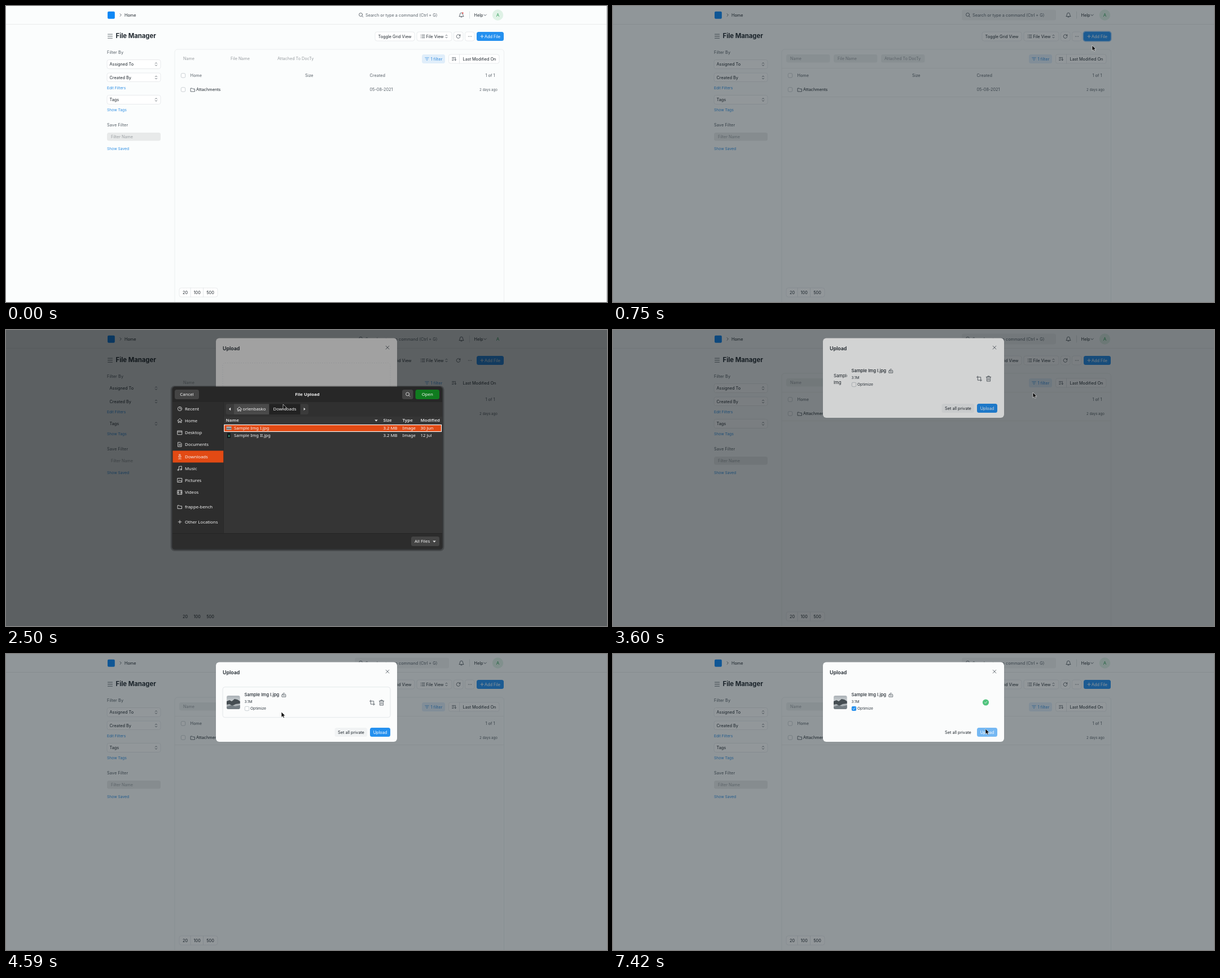
An HTML page for the animation above (8 s loop, 1065 px wide and 526 px high).

```html
<!DOCTYPE html>
<html lang="en">
<head>
<meta charset="utf-8">
<title>File upload</title>
<style>
  html, body { margin: 0; width: 100%; height: 100%; overflow: hidden; background: #fbfdfd; }
  svg { display: block; width: 1065px; height: 526px; }
  text { font: 400 7.3px Inter, sans-serif; fill: #1f272e; white-space: pre; }
  .muted { fill: #59626a; }
  .hint { font-size: 7.2px; fill: #989da1; }
  .label { font-size: 7.2px; letter-spacing: .15px; fill: #505a62; }
  .link { font-size: 6.7px; fill: #2c8ee4; }
  .title { font-size: 11.3px; font-weight: 700; }
  .head { font-size: 8.8px; font-weight: 600; }
  .big { font-size: 7.75px; }
  .name { font-size: 7.75px; font-weight: 500; }
  .small { font-size: 6.15px; }
  .meta { font-size: 6.7px; fill: #333c44; }
  .white { fill: #fff; }
  .mid { text-anchor: middle; }
  .end { text-anchor: end; }
  #picker text { font: 400 7.8px "Noto Sans", sans-serif; fill: #f4f4f4; }
  #picker .bold { font-weight: 700; }
  #picker .col { font-weight: 600; fill: #d0d0d0; }
  .ico { fill: none; stroke: #414a52; stroke-width: .8; stroke-linecap: round; stroke-linejoin: round; }
  .lite { stroke: #fff; }
  .btn { fill: #fff; stroke: #e0e3e5; stroke-width: .7; }
</style>
</head>
<body>
<svg id="stage" viewBox="0 0 1065 526" xmlns="http://www.w3.org/2000/svg"></svg>
<script>
const LOOP = 8000, STEP = 120;
const BLUE = '#2490ef', GREEN = '#48bb74';

// Markup helpers: text is placed by its vertical centre
const text = (x, cy, s, cls = '', dy = 2.65) => `<text x="${x}" y="${cy + dy}" class="${cls}">${s}</text>`;
const box = (x, y, x2, y2, fill, r = 3.5, more = '') =>
  `<rect x="${x}" y="${y}" width="${x2 - x}" height="${y2 - y}" rx="${r}" fill="${fill}" ${more}/>`;
const btn = (x, y, x2, y2) => box(x, y, x2, y2, '#fff', 3.5, 'class="btn"');
const ico = (x, y, d, more = '') => `<path class="ico" transform="translate(${x} ${y})" d="${d}" ${more}/>`;
const dot = (x, y, r, fill) => `<circle cx="${x}" cy="${y}" r="${r}" fill="${fill}"/>`;
const group = (id, ...parts) => `<g id="${id}">${parts.join('')}</g>`;

const UPDOWN = 'M-1.5-1.3L0-2.8 1.5-1.3M-1.5 1.3L0 2.8 1.5 1.3';
const DOWN = 'M-2.3-1L0 1.3 2.3-1';
const RIGHT = 'M-1-2.3L1.3 0-1 2.3';
const FOLDER = 'M-3.5-2.8H-1L0-1.6H3.5V3H-3.5Z';
const LENS = 'M2.6-.6A3 3 0 1 1-3.4-.6 3 3 0 1 1 2.6-.6M1.8 1.7L3.8 3.7';
const TICK = 'M-2 .1L-.6 1.5 2-1.4';
const HOUSE = 'M-4 .2L0-3.8 4 .2M-2.8-.8V3.6H-1V1H1V3.6H2.8V-.8';
const checkbox = (x, y) => box(x - 3.7, y - 3.7, x + 3.7, y + 3.7, '#fff', 1.8, 'stroke="#b4bcc2" stroke-width=".7"');

function page() {
  const fills = group('fills',
    box(299, 77, 882.5, 540, 'none', 5, 'stroke="#eceff0"'),
    btn(654, 46, 724, 62), btn(728, 46, 790, 62), btn(793.5, 46, 810, 62), btn(813.5, 46, 830, 62),
    btn(179, 95.5, 274, 111.5), btn(179, 119, 274, 134.5), btn(179, 158.5, 274, 174.5),
    box(179, 225, 274, 239.5, '#e8eaea'),
    box(737, 86, 778, 102, '#e0eefa'), btn(784.5, 86, 874, 102), btn(307, 501, 375, 517),
    ico(803.5, 94, 'M0-8V8', 'style="stroke:#dfe3e5"'),
    ico(327, 509, 'M0-8V8M22.5-8V8', 'style="stroke:#dfe3e5"'),
    dot(871.5, 16, 9.7, '#dff2e6'), checkbox(314, 123.5), checkbox(314, 148.5));
  const fields = group('fields',
    box(618, 6.5, 785, 25.5, '#eff1f2'),
    ...[307, 391, 475].map(x => box(x, 86, x + 77.5, 100.5, '#eceff0')),
    ico(299, 110.5, 'M0 0H583M0 51H583', 'style="stroke:#eaedee"'));
  return [
    box(0, 0, 1065, 526, '#fbfdfd', 0), box(0, 32, 1065, 33, '#e9ecec', 0), fields, fills,
    box(180, 9.8, 192.8, 22.8, '#0d87f5', 2),
    ico(203, 16, RIGHT), text(210, 16, 'Home'),
    ico(629, 16, LENS), text(637, 16, 'Search or type a command (Ctrl + G)', 'muted'),
    ico(807, 15.5, 'M-3.8 2.8Q-2.6 1.6-2.6-.6A2.6 2.8 0 0 1 2.6-.6Q2.6 1.6 3.8 2.8ZM-1 4.3H1'),
    group('badge', dot(809.3, 12.5, 1.2, '#e24c4c')),
    ico(821.5, 16, 'M0-6V6', 'style="stroke:#d4d8db"'),
    text(829.5, 16, 'Help'), ico(849, 16, DOWN),
    text(871.5, 16, 'A', 'mid" style="fill:#2f9d58;font-size:8px', 2.9),
    ico(184.5, 53.7, 'M-4-3.5H4M-4 0H4M-4 3.5H4'), text(194.5, 53, 'File Manager', 'title', 4.1),
    text(659.5, 54, 'Toggle Grid View'),
    ico(738.5, 54, 'M-1.5-2.5H3.5M-1.5 0H3.5M-1.5 2.5H3.5M-3.5-2.5h.2M-3.5 0h.2M-3.5 2.5h.2'),
    text(744.5, 54, 'File View'), ico(780.5, 54, UPDOWN),
    ico(801.5, 54, 'M3.3 .6A3.3 3.3 0 1 1 2.5-2.2L3.3-1.2M3.4-3.3V-1.1H1.3'),
    ico(822, 54, 'M-2.5 0h.1M0 0h.1M2.5 0h.1', 'style="stroke-width:1.2"'),
    group('ring', box(833.3, 45.3, 882.7, 62.7, 'none', 4, 'stroke="#8cc2f5" stroke-width="1.6"')),
    box(834, 46, 882, 62, BLUE), ico(843.5, 54, 'M-2.7 0H2.7M0-2.7V2.7', 'style="stroke:#fff"'),
    text(848, 54, 'Add File', 'white'),
    text(179, 82.5, 'Filter By', 'label'),
    text(183.5, 103.5, 'Assigned To'), text(183.5, 127, 'Created By'), text(183.5, 166.5, 'Tags'),
    ...[103.5, 127, 166.5].map(y => ico(266, y, UPDOWN)),
    text(179, 145.5, 'Edit Filters', 'link'), text(179, 184.5, 'Show Tags', 'link'),
    text(179, 211, 'Save Filter', 'label'),
    text(186, 232.3, 'Filter Name', 'hint'), text(179, 253.2, 'Show Saved', 'link'),
    text(314, 93, 'Name', 'hint'), text(398, 93, 'File Name', 'hint'), text(481, 93, 'Attached To DocTy', 'hint'),
    ico(746, 94, 'M-3.3-2.3H3.3M-2 0H2M-.7 2.3H.7', 'style="stroke:#4b9be4"'),
    text(752.5, 94, '1 filter', '" style="fill:#3b8fdf'),
    ico(794, 94, 'M-3.5-2.5H.8M-3.5 0H0M-3.5 2.5H-1M2.3-2.8V2.8M.9 1.4L2.3 2.8 3.7 1.4'),
    text(809.5, 94, 'Last Modified On'),
    text(326.5, 123.5, 'Home', 'muted'), text(530, 123.5, 'Size', 'muted'),
    text(644.5, 123.5, 'Created', 'muted'), text(866.5, 123.5, '1 of 1', 'muted end'),
    ico(331, 149, FOLDER), text(337, 148.5, 'Attachments'),
    text(644.5, 148.5, '05-08-2021', 'muted'), text(871, 148.5, '2 days ago', 'small muted end', 2.2),
    text(317.5, 509, '20', 'mid'), text(338.7, 509, '100', 'mid'), text(362, 509, '500', 'mid'),
    group('edge', box(1064, 0, 1065, 526, '#c4c8c9', 0)),
  ].join('');
}

function modal() {
  const source = (x, fill, d, label) => dot(x, 132, 8.4, fill) + ico(x, 132, d, 'style="stroke:#fff"') +
    text(x, 147.3, label, 'small mid', 2.2);
  const drop = group('drop',
    box(384, 58.5, 681, 201, 'none', 4, 'stroke="#e7eaec" stroke-width=".8" stroke-dasharray="2 2"'),
    text(532.3, 110, 'Drag and drop files here or upload from', 'big mid'),
    source(493.5, BLUE, 'M-4-3.2H4V2H-4ZM-2 3.6H2', 'My Device'),
    source(539, GREEN, 'M-4-1.5H4V3.5H-4ZM-3.2-3.3H0L1-1.6M-2 .5H2', 'Library'),
    source(577.5, '#eaa843', 'M-.6 1.8L-2 3.2A1.6 1.6 0 0 1-4 .8L-1.8-1.2M.6-1.8L2-3.2A1.6 1.6 0 0 1 4-.8L1.8 1.2M-1.5 1.5L1.5-1.5', 'Link'));
  const file = group('file',
    group('frame', box(384, 58.7, 681, 112.7, 'none', 4, 'stroke="#dfe3e5" stroke-width=".8"')),
    group('alt', '<g clip-path="url(#clip)">', text(391, 81, 'Sample', 'big'), text(391, 93.5, 'Img', 'big'), '</g>'),
    group('thumb', '<g clip-path="url(#clip)">', box(391, 74, 415, 98, 'url(#sky)', 0),
      '<path d="M391 84l5-2 4 2 5-4 5 1 5 3v4l-8 1-6 3-5-3-5 1z" fill="#454d52"/>',
      '<path d="M391 94l8-3 7 2 9-2v7h-24z" fill="#747d83"/></g>'),
    text(422.5, 72, 'Sample Img I.jpg', 'name', 2.8),
    ico(492.5, 73, 'M-3.2-.8H3.2V3.2H-3.2ZM-1.8-.8V-2A1.8 1.8 0 0 1 1.6-2.6M0 .7V1.7'),
    text(422.5, 84.3, '3.1M', 'meta', 2.4),
    checkbox(427, 97),
    group('checked', box(422.9, 92.9, 431.1, 101.1, BLUE, 2), ico(427, 97, TICK, 'style="stroke:#fff"')),
    text(433, 97, 'Optimize', 'meta', 2.4),
    group('tools',
      ico(649, 86.5, 'M-2.7-4.6V2.7H4.6M-4.6-2.7H2.7V4.6'),
      ico(665.5, 86.5, 'M-4.2-3H4.2M-1.5-3V-4.6H1.5V-3M-3.3-3L-3 4.6H3L3.3-3M-1.1-.8V2.6M1.1-.8V2.6')),
    group('busy', '<circle cx="660.5" cy="86" r="5" fill="none" stroke="#d9e1e8" stroke-width="1.3"/>',
      `<path d="M660.5 81A5 5 0 1 1 655.5 86" fill="none" stroke="${BLUE}" stroke-width="1.3"/>`),
    group('done', dot(660.5, 86, 5.6, '#51c47e'), ico(660.5, 86, TICK, 'style="stroke:#fff"')));
  return group('modal',
    '<rect id="sheet" x="372" y="14.5" width="321" rx="6" fill="#fbfcfc"/>',
    text(384, 32.5, 'Upload', 'head', 3.1), ico(676, 31.2, 'M-2.8-2.8L2.8 2.8M2.8-2.8L-2.8 2.8'),
    drop, file,
    group('actions', group('plain', box(582.5, 131, 640, 147, '#f1f3f4')),
      text(588, 139.2, 'Set all private'),
      group('send', box(645, 131, 681, 147, BLUE), text(663, 139.2, 'Upload', 'white mid'))));
}

function picker() {
  const places = [
    ['Recent', 140, 'M3.6 0A3.6 3.6 0 1 1-3.6 0 3.6 3.6 0 1 1 3.6 0M0-2V0H1.6'],
    ['Home', 161, HOUSE],
    ['Desktop', 182.5, 'M-3.8-3.3H3.8V3.3H-3.8ZM-3.8-1.3H3.8'],
    ['Documents', 203.5, 'M-3-3.8H1L3-1.8V3.8H-3ZM-1.5-.5H1.5M-1.5 1.5H1.5'],
    ['Downloads', 225, 'M-1-3.8H1V0H2.6L0 2.6-2.6 0H-1ZM-2.5 4H2.5'],
    ['Music', 246, 'M-1.6 2.6V-3.4L3.2-4V1.8M-1.6 2.6a1.2 1.2 0 1 1-2.4 0 1.2 1.2 0 1 1 2.4 0M3.2 1.8a1.2 1.2 0 1 1-2.4 0 1.2 1.2 0 1 1 2.4 0'],
    ['Pictures', 267, 'M-3.8-3.5H3.8V3.5H-3.8ZM-2.6 2L-.8-.4 .5 1 1.6 0 2.8 2'],
    ['Videos', 288.5, 'M-3.8-3.5H3.8V3.5H-3.8ZM-2-3.5V3.5M2-3.5V3.5M-3.8 0H-2M2 0H3.8'],
    ['frappe-bench', 314.5, FOLDER],
    ['Other Locations', 341, 'M-2.8 0H2.8M0-2.8V2.8']];
  const cells = (y, cls, ...cols) => cols.map((s, i) => text([404, 668.5, 702.5, 734.5][i], y, s, cls)).join('');
  const lite = (x, y, d) => ico(x, y, d, 'style="stroke:#eee"');
  const tri = (x, y, d) => `<path transform="translate(${x} ${y})" d="${d}" fill="#e4e4e4"/>`;
  return group('picker',
    box(291.5, 99, 776.5, 393, '#000', 7, 'opacity=".22"'), box(293.5, 100, 774.5, 391, '#000', 6, 'opacity=".3"'),
    box(295, 101, 773, 389, '#353535', 5),
    box(295, 101, 773, 128, '#272727', 5), box(295, 121, 773, 128, '#272727', 0),
    box(295, 128, 385.5, 362, '#2d2d2d', 0), box(386, 128, 773, 154, '#303030', 0),
    box(295, 361.5, 773, 384, '#2c2c2c', 0), box(295, 378, 773, 389, '#2c2c2c', 4),
    box(295, 361, 773, 361.7, '#222', 0), box(385.4, 128, 386, 361, '#232323', 0),
    box(299, 106, 342, 123, '#444'), text(320.5, 114.3, 'Cancel', 'mid'),
    text(534, 114.3, 'File Upload', 'bold mid'),
    box(702, 106, 721.5, 123, '#444'), lite(712, 114.5, LENS),
    box(725.5, 106, 768, 123, '#107c1f'), text(746.8, 114.3, 'Open', 'mid'),
    box(295.5, 214.5, 385.3, 235.5, '#e24a14', 0),
    ...places.map(([s, y, d]) => lite(308, y, d) + text(317, y, s)),
    box(389.5, 131.5, 536, 150, '#3b3b3b'), box(404, 131.5, 466, 150, '#4a4a4a', 0), box(466.5, 131.5, 521.5, 150, '#222', 0),
    tri(396.5, 140.5, 'M1.6-2.8V2.8L-1.6 0Z'), lite(413.5, 140.5, HOUSE),
    text(419.5, 140.5, 'orlenbasko'), text(494, 140.5, 'Downloads', 'mid'), tri(529, 140.5, 'M-1.4-2.6V2.6L1.6 0Z'),
    text(389.5, 160.7, 'Name', 'col'), tri(656, 160.7, 'M-2.8-1.3H2.8L0 1.7Z'),
    cells(160.7, 'col', '', 'Size', 'Type', 'Modified'),
    box(386.7, 168.5, 771.5, 180.5, '#e24a14', 0, 'stroke="#fff" stroke-width="1.1"'),
    box(390.5, 171.5, 399.5, 177.5, '#a9b2b8', 0), box(390.5, 174.2, 399.5, 175.8, '#59636a', 0),
    cells(174.5, '', 'Sample Img I.jpg', '3.2 MB', 'Image', '30 Jun'),
    box(392, 183, 397.8, 192, '#101a1a', 0), box(394, 186.5, 396.3, 190, '#3f8f74', 0),
    cells(187.5, '', 'Sample Img II.jpg', '3.2 MB', 'Image', '12 Jul'),
    box(718, 367, 768, 384, '#444'), text(724, 375.5, 'All Files'), tri(759, 375.7, 'M-2.8-1.3H2.8L0 1.7Z'));
}

const stage = document.getElementById('stage');
stage.innerHTML = `<defs>
  <clipPath id="clip"><rect x="391" y="74" width="23.7" height="24" rx="3"/></clipPath>
  <linearGradient id="sky" x2="0" y2="1"><stop stop-color="#aab1b6"/><stop offset=".4" stop-color="#c9ced1"/><stop offset="1" stop-color="#8d959a"/></linearGradient>
  </defs>` + page() + box(0, 0, 1065, 526, '#131e24', 0, 'id="shade"') + modal() +
  box(0, 0, 1065, 526, '#000', 0, 'id="dim"') + picker() +
  group('cursor',
    '<path id="arrow" d="M0 0V9.4L2.2 7.4 3.7 10.6 5.3 9.9 3.9 6.8H6.9Z" fill="#0a0a0a" stroke="#fff" stroke-width=".6"/>',
    '<path id="hand" d="M-1 0Q0-1.2 1 0V3.4L4.6 4.2Q5.6 4.6 5.4 6L4.6 9.6H-.8L-3.6 5.6Q-3.4 4.4-2.3 4.8L-1 6Z" fill="#fff" stroke="#111" stroke-width=".9"/>');
const el = {};
stage.querySelectorAll('[id]').forEach(n => el[n.id] = n);

// Bursts of screen updates: first time and count
const bursts = [[510, 6], [1250, 5], [2000, 4], [2500, 4], [3000, 7], [3840, 1], [3990, 1],
  [4230, 4], [4730, 2], [5100, 3], [5860, 2], [6130, 3], [6520, 4], [7300, 2]];
const ticks = bursts.flatMap(([t, n]) => Array.from({ length: n }, (_, i) => t + i * STEP));
const snap = t => ticks.reduce((last, k) => k <= t ? k : last, 0);

// Tracks of [time, value, ...], linear between keys
const tracks = {
  shade: [[390, 0], [510, .12], [630, .36], [750, .46]],
  modal: [[750, 0], [870, .45], [990, .85], [1110, 1]],
  dim: [[1880, 0], [2000, .1], [2360, .36], [3240, .36], [3720, .1], [3840, 0]],
  picker: [[1880, 0], [2000, .35], [2240, 1], [3240, 1], [3480, 0]],
  fills: [[2000, 1], [2360, 0], [3240, 0], [3600, 1]],
  cursor: [[510, 856, 57], [750, 849, 70], [1110, 832, 80], [1250, 790, 87], [1610, 510, 127], [1730, 493, 131.5],
    [2000, 491, 132], [2860, 491, 132], [3240, 744, 111], [4110, 744, 111], [4230, 700, 110], [4590, 488, 103],
    [4730, 440, 99], [4850, 430, 97], [5860, 430, 96.5], [5980, 471, 103], [6370, 600, 122], [6880, 660, 133]],
};
function at(keys, t) {
  const i = keys.findIndex(k => k[0] > t);
  if (i === 0) return keys[0].slice(1);
  if (i < 0) return keys[keys.length - 1].slice(1);
  const [a, b] = [keys[i - 1], keys[i]], p = (t - a[0]) / (b[0] - a[0]);
  return a.slice(1).map((v, j) => v + (b[j + 1] - v) * p);
}

// Spans in which a part is visible
const spans = {
  edge: [0, 510], badge: [0, 510], fields: [510, LOOP], ring: [510, 870], cursor: [510, LOOP],
  hand: [1610, 2000], drop: [0, 3360], file: [3360, LOOP], alt: [0, 3990], thumb: [3990, LOOP],
  frame: [4230, 6250], plain: [3360, 6250], checked: [5100, LOOP],
  tools: [0, 7300], busy: [7300, 7420], done: [7420, LOOP],
};

function draw(now) {
  const t = snap(now % LOOP);
  for (const id in spans) {
    const [from, to] = spans[id];
    el[id].style.display = t >= from && t < to ? '' : 'none';
  }
  for (const id of ['shade', 'modal', 'dim', 'picker', 'fills']) el[id].setAttribute('opacity', at(tracks[id], t)[0]);
  if (t >= 2120 && t < 3360) el.fields.style.display = 'none';
  el.arrow.style.display = el.hand.style.display ? '' : 'none';
  el.cursor.setAttribute('transform', `translate(${at(tracks.cursor, t)})`);
  const tall = t < 3360;
  el.sheet.setAttribute('height', tall ? 229.5 : 141.5);
  el.actions.setAttribute('transform', `translate(0 ${tall ? 88 : 0})`);
  el.modal.setAttribute('transform', `translate(0 ${-28 * (1 - at(tracks.modal, t)[0])})`);
  el.send.setAttribute('opacity', t >= 7420 ? .62 : 1);
}

const start = performance.now();
function frame() {
  draw(performance.now() - start);
  requestAnimationFrame(frame);
}
frame();
</script>
</body>
</html>
```
